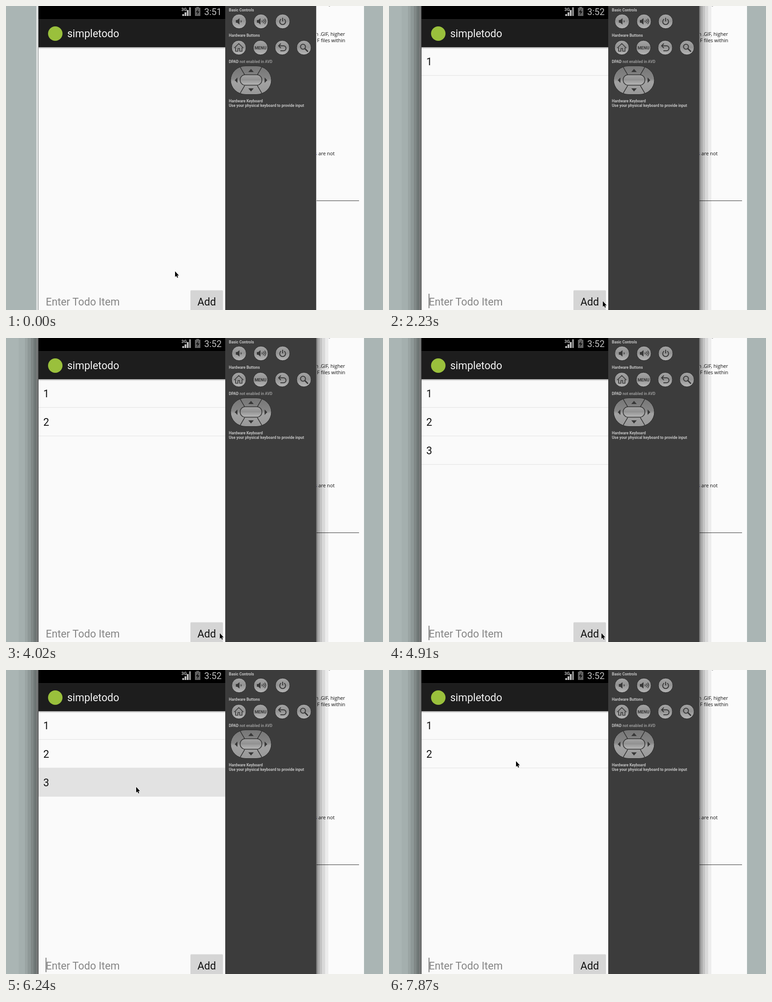
These frames come from a looping animation (834 by 672 pixels, 8 s). An HTML page:

```html
<!DOCTYPE html>
<html lang="en">
<head>
<meta charset="utf-8">
<title>Todo list demo</title>
<style>
  html, body { margin: 0; width: 100%; height: 100%; overflow: hidden; background: #aab5b4; }
  svg { display: block; width: 834px; height: 672px; }
  text { white-space: pre; }
  .page { font: 10.8px "Open Sans", sans-serif; fill: #111; text-anchor: end; }
  .app { font: 23px Roboto, sans-serif; fill: #111; }
  .status { font: 20px Roboto, sans-serif; fill: #bebebe; }
  .label { font: bold 8.5px Roboto, sans-serif; fill: #c4c4c4; }
  .hint { font-size: 23.2px; fill: #868686; }
  .line { stroke: #e2e2e2; }
  .icon { fill: none; stroke: #383838; stroke-width: 2; stroke-linejoin: round; }
  .solid { fill: #383838; }

  /* every change is a hard cut; percentages are ms / 80 */
  .anim { animation: 8s step-end infinite; }
  #shadow { animation-name: shadow; }
  #old { animation-name: old; }
  #new { animation-name: new; }
  #row1 { animation-name: row1; }
  #row2 { animation-name: row2; }
  #row3 { animation-name: row3; }
  #held { animation-name: held; }
  #hint { animation-name: hint; }
  #key1 { animation-name: key1; }
  #key2 { animation-name: key2; }
  #key3 { animation-name: key3; }
  #add { animation-name: add; }
  #caret { animation-name: caret; }
  #mouse { animation-name: mouse; }

  @keyframes shadow { 0% { opacity: 0 } 3.75%, 100% { opacity: 1 } }
  @keyframes old { 0% { opacity: 1 } 18.625%, 100% { opacity: 0 } }
  @keyframes new { 0% { opacity: 0 } 18.625%, 100% { opacity: 1 } }
  @keyframes row1 { 0% { opacity: 0 } 27.875%, 100% { opacity: 1 } }
  @keyframes row2 { 0% { opacity: 0 } 44.625%, 100% { opacity: 1 } }
  @keyframes row3 { 0%, 85.5%, 100% { opacity: 0 } 61.375% { opacity: 1 } }
  @keyframes held {
    0% { fill: #fafafa } 78% { fill: #e2e2e2 } 79.875% { fill: #d6d6d6 }
    81.75%, 100% { fill: #cccccc }
  }
  @keyframes hint {
    0%, 27.875%, 44.625%, 61.375%, 100% { opacity: 1 }
    16.75%, 37.25%, 53.875% { opacity: 0 }
  }
  @keyframes key1 { 0%, 27.875%, 100% { opacity: 0 } 16.75% { opacity: 1 } }
  @keyframes key2 { 0%, 44.625%, 100% { opacity: 0 } 37.25% { opacity: 1 } }
  @keyframes key3 { 0%, 61.375%, 100% { opacity: 0 } 53.875% { opacity: 1 } }
  @keyframes add {
    0%, 27.875%, 44.625%, 61.375%, 100% { fill: #d5d5d5 }
    26%, 42.75%, 57.625% { fill: #bdbdbd }
  }
  @keyframes caret {
    0%, 11.125%, 22.25%, 33.5%, 42.75%, 50.25%, 57.625%, 66.875%, 79.875%, 92.875% {
      opacity: 0; transform: none;
    }
    5.5%, 27.875%, 44.625%, 61.375%, 72.5%, 85.5%, 98.375%, 100% { opacity: 1; transform: none }
    16.75%, 37.25%, 53.875% { opacity: 1; transform: translateX(13px) }
  }
  @keyframes mouse {
    0% { transform: translate(374px, 586px) }
    5.5% { transform: translate(374px, 591px) }
    18.625% { transform: translate(392px, 604px) }
    20.375% { transform: translate(425px, 628px) }
    22.25% { transform: translate(458px, 646px) }
    24.125% { transform: translate(473px, 652px) }
    52% { transform: translate(471px, 652px) }
    53.875% { transform: translate(470px, 652px) }
    65% { transform: translate(458px, 630px) }
    66.875% { transform: translate(400px, 520px) }
    68.75% { transform: translate(338px, 390px) }
    70.625% { transform: translate(306px, 314px) }
    72.5% { transform: translate(288px, 258px) }
    91% { transform: translate(287px, 245px) }
    92.875% { transform: translate(283px, 216px) }
    94.75%, 100% { transform: translate(281px, 201px) }
  }
</style>
</head>
<body>
<svg viewBox="0 0 834 672">
  <defs>
    <linearGradient id="metal" x2="0" y2="1">
      <stop stop-color="#a4a4a4"/><stop offset=".5" stop-color="#919191"/>
      <stop offset=".55" stop-color="#9a9a9a"/><stop offset="1" stop-color="#b6b6b6"/>
    </linearGradient>
    <linearGradient id="pad" x2="0" y2="1">
      <stop stop-color="#767676"/><stop offset=".45" stop-color="#858585"/>
      <stop offset=".55" stop-color="#a2a2a2"/><stop offset="1" stop-color="#989898"/>
    </linearGradient>
    <linearGradient id="drop" x2="0" y2="1">
      <stop stop-color="#aaa"/><stop offset="1" stop-color="#fafafa"/>
    </linearGradient>
    <circle id="knob" r="16" fill="url(#metal)" stroke="#292929"/>
    <path id="speaker" class="solid" d="M-7-3h3l5-4v14l-5-4h-3z"/>
  </defs>

  <!-- web page behind -->
  <rect width="834" height="672" fill="#aab5b4"/>
  <rect x="67" width="725" height="672" fill="#fbfbfb"/>
  <path d="M714 0q2 1 4-1" fill="none" stroke="#555"/>
  <g class="page">
    <text x="750" y="66">in .GIF, higher</text>
    <text x="750.500" y="79.500">GIF files within</text>
    <text x="727" y="330"><tspan fill="#00008b">s</tspan> are not</text>
  </g>
  <path d="M680 430.500H781" stroke="#333"/>

  <!-- window shadow -->
  <rect x="67" width="4" height="672" fill="#dfe2e2"/>
  <rect x="71" width="1" height="672" fill="#8c9090"/>
  <rect x="686" width="1" height="672" fill="#ccc"/>
  <g id="shadow" class="anim">
    <path fill-opacity=".03" d="M28 0h44v672h-44z"/>
    <path fill-opacity=".06" d="M42 0h30v672h-30zM686 0h27v672h-27z"/>
    <path fill-opacity=".08" d="M48 0h24v672h-24zM686 0h20v672h-20z"/>
    <path fill-opacity=".1" d="M55 0h17v672h-17zM686 0h13v672h-13z"/>
    <path fill-opacity=".12" d="M61 0h11v672h-11zM686 0h8v672h-8z"/>
    <path fill-opacity=".15" d="M66 0h6v672h-6zM686 0h4v672h-4z"/>
    <path fill-opacity=".12" d="M69 0h3v672h-3zM686 0h2v672h-2z"/>
  </g>

  <!-- phone -->
  <rect x="72" width="414" height="672" fill="#fafafa"/>
  <rect x="72" width="414" height="29" fill="#000"/>
  <rect x="72" y="29" width="414" height="62" fill="#1d1d1d"/>
  <path d="M72 29.500H486" stroke="#262626"/>
  <rect x="72" y="91" width="414" height="4" fill="url(#drop)"/>

  <text x="388" y="11" style="font: bold 9.500px Roboto, sans-serif" fill="#bebebe">3G</text>
  <path d="M390 18h4v4h-4zM395 14h4v8h-4zM400 9h4v13h-4z" fill="#bebebe"/>
  <path d="M405 3h4v19h-4z" fill="#8c8c8c"/>
  <path d="M421 2h6v2h3v18h-12v-18h3z" fill="#626262"/>
  <path d="M426 6l-6 8h4l-2 6 6-8h-4z" fill="#111"/>
  <g class="status">
    <text id="old" class="anim" x="438.500" y="20">3:51</text>
    <text id="new" class="anim" x="438.500" y="20">3:52</text>
  </g>

  <circle cx="109" cy="61" r="16" fill="#9ac03c"/>
  <text class="app" x="135.500" y="69" style="fill: #f3f3f3">simpletodo</text>

  <g class="app">
    <g id="row1" class="anim">
      <text x="82.500" y="130.500">1</text>
      <path class="line" d="M72 153.500H485"/>
    </g>
    <g id="row2" class="anim">
      <text x="82.500" y="193.500">2</text>
      <path class="line" d="M72 216.500H485"/>
    </g>
    <g id="row3" class="anim">
      <rect id="held" class="anim" x="72" y="217" width="413" height="62"/>
      <text x="82.500" y="256.500">3</text>
      <path class="line" d="M72 279.500H485"/>
    </g>
    <text id="hint" class="anim hint" x="88" y="661.500">Enter Todo Item</text>
    <text id="key1" class="anim" x="88" y="661.500">1</text>
    <text id="key2" class="anim" x="88" y="661.500">2</text>
    <text id="key3" class="anim" x="88" y="661.500">3</text>
    <rect id="caret" class="anim" x="88" y="636" width="1" height="32" fill="#111"/>
    <rect id="add" class="anim" x="408" y="628.500" width="72" height="50" rx="2"/>
    <path d="M409 628.500H479" stroke="#e6e6e6"/>
    <text x="444" y="662" text-anchor="middle">Add</text>
  </g>

  <!-- emulator controls -->
  <rect x="485" width="201" height="672" fill="#3c3c3c"/>
  <g class="label">
    <text x="493" y="11.500">Basic Controls</text>
    <text x="493" y="67.500">Hardware Buttons</text>
    <text x="493" y="126">DPAD<tspan fill="#989898"> not enabled in AVD</tspan></text>
    <text x="493" y="213">Hardware Keyboard</text>
    <text x="493" y="222.500">Use your physical keyboard to provide input</text>
  </g>

  <g transform="translate(515.500 34)">
    <use href="#knob"/><use href="#speaker"/>
    <path class="icon" d="M4-2q2 2 0 4" style="stroke-width: 1.500"/>
  </g>
  <g transform="translate(564 34)">
    <use href="#knob"/><use href="#speaker" x="-2"/>
    <path class="icon" d="M2-2q2 2 0 4M5-4q4 4 0 8M8-6q5 6 0 12" style="stroke-width: 1.500"/>
  </g>
  <g transform="translate(612 34)">
    <use href="#knob"/>
    <path class="icon" d="M-3.500-5a6.500 6.500 0 1 0 7 0M0-8v8"/>
  </g>
  <g transform="translate(515 92)">
    <use href="#knob"/>
    <path class="icon" d="M-10 1L0-9 10 1M-7 0v8h5v-6h4v6h5v-8" style="stroke-width: 1.700"/>
  </g>
  <g transform="translate(563 92)">
    <use href="#knob"/>
    <text y="3.500" text-anchor="middle" class="solid" style="font: bold 9.300px Roboto, sans-serif">MENU</text>
  </g>
  <g transform="translate(611 92)">
    <use href="#knob"/>
    <path class="icon" d="M-3-9l-5 5 5 5M-8-4h11a5.500 5.500 0 0 1 0 11h-7"/>
  </g>
  <g transform="translate(659 92)">
    <use href="#knob"/>
    <circle class="icon" cx="-2" cy="-2" r="5.500"/>
    <path class="icon" d="M2 2l7 7" style="stroke-width: 3"/>
  </g>

  <g transform="translate(542 164)">
    <rect x="-45" y="-31.500" width="90" height="63" rx="33" ry="31.500" fill="url(#pad)" stroke="#292929"/>
    <path d="M-24-29l10 17M24-29l-10 17M-24 29l10-17M24 29l-10-17" stroke="#343434" stroke-width="1.500"/>
    <rect x="-24" y="-12" width="48" height="23" rx="11" fill="url(#metal)" stroke="#333" stroke-width="1.500"/>
    <path class="solid" d="M-6-18h12l-6-7zM-6 18h12l-6 7zM-30-6v12l-6-6zM30-6v12l6-6z"/>
  </g>

  <path id="mouse" class="anim" d="M0 .5V13L2.700 10.500 4.800 14.800 6.700 13.900 4.700 9.700H8.500z"
        stroke="#fff" stroke-width="1.200" paint-order="stroke"/>
</svg>
</body>
</html>
```
